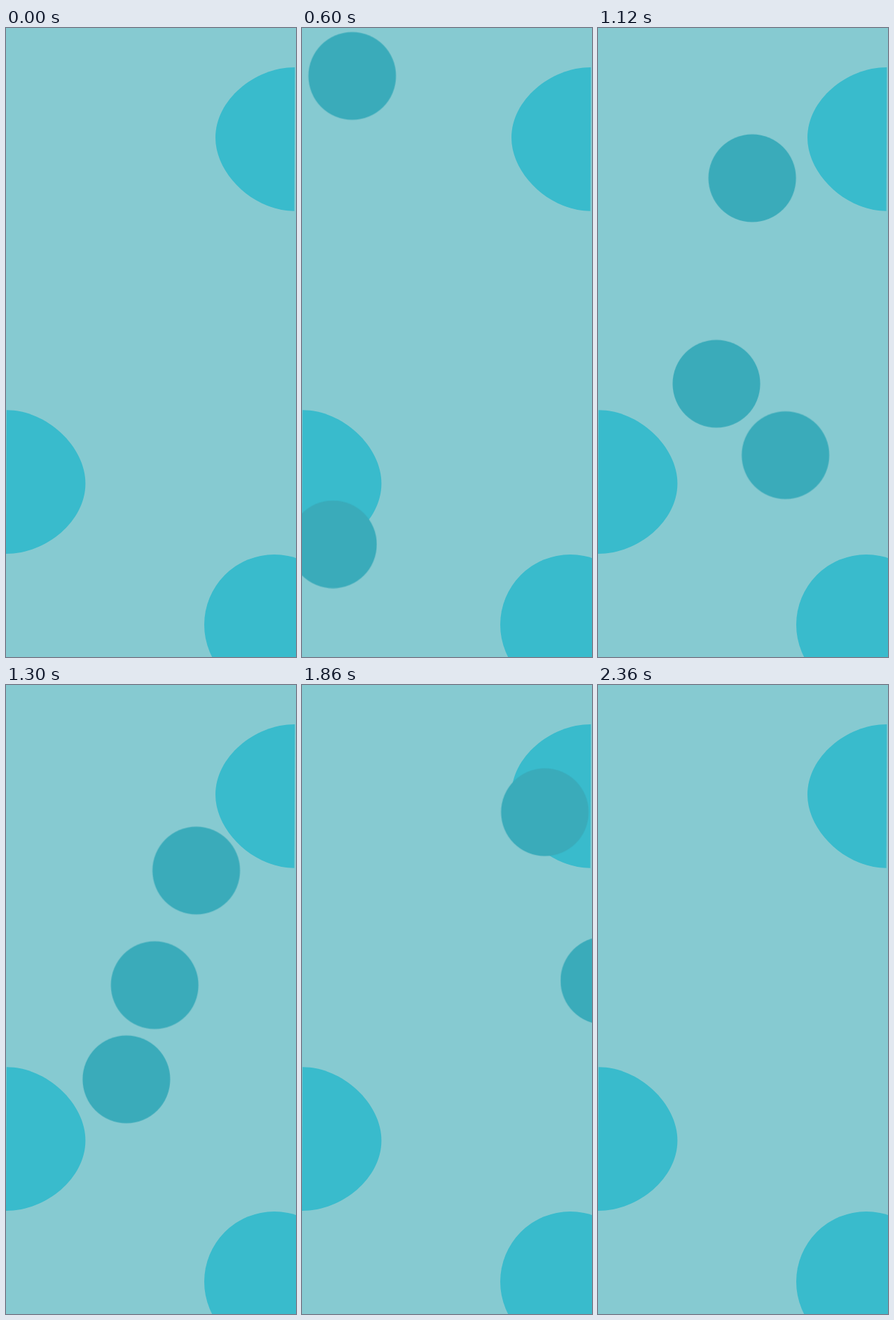
An HTML page for the animation above (2520 ms loop, 414 by 896 pixels).

```html
<!DOCTYPE html>
<html lang="en">
<head>
<meta charset="utf-8">
<title>Drifting circles</title>
<style>
  html, body { margin: 0; width: 100%; height: 100%; overflow: hidden; background: #86cad1; }
  svg { display: block; width: 414px; height: 896px; }
  .still { fill: #39bbcc; }
  .drift { fill: #3aabba; animation: drift 2520ms linear infinite; }
  .down { --from: translate(-100px, -100px); --to: translate(614px, 600px); }
  .up { --from: translate(-100px, 1000px); --to: translate(500px, -100px); }
  .left { --from: translate(864px, 900px); --to: translate(-466px, 250px); }
  /* 2500 ms of travel, then one 20 ms rest off stage */
  @keyframes drift {
    0% { transform: var(--from); }
    99.2063%, 100% { transform: var(--to); }
  }
</style>
</head>
<body>
<svg viewBox="0 0 414 896">
  <defs>
    <path id="dome" d="M.8 544.3C58 544.3 113.4 596 113.4 649C113.4 702 58 749 0 749Z"/>
  </defs>
  <g class="still">
    <use href="#dome"/>
    <use href="#dome" transform="rotate(180 206.2 402.5)"/>
    <circle cx="383" cy="850" r="100"/>
  </g>
  <circle class="drift down" r="62.5"/>
  <circle class="drift up" r="62.5"/>
  <circle class="drift left" r="62.5"/>
</svg>
</body>
</html>
```
